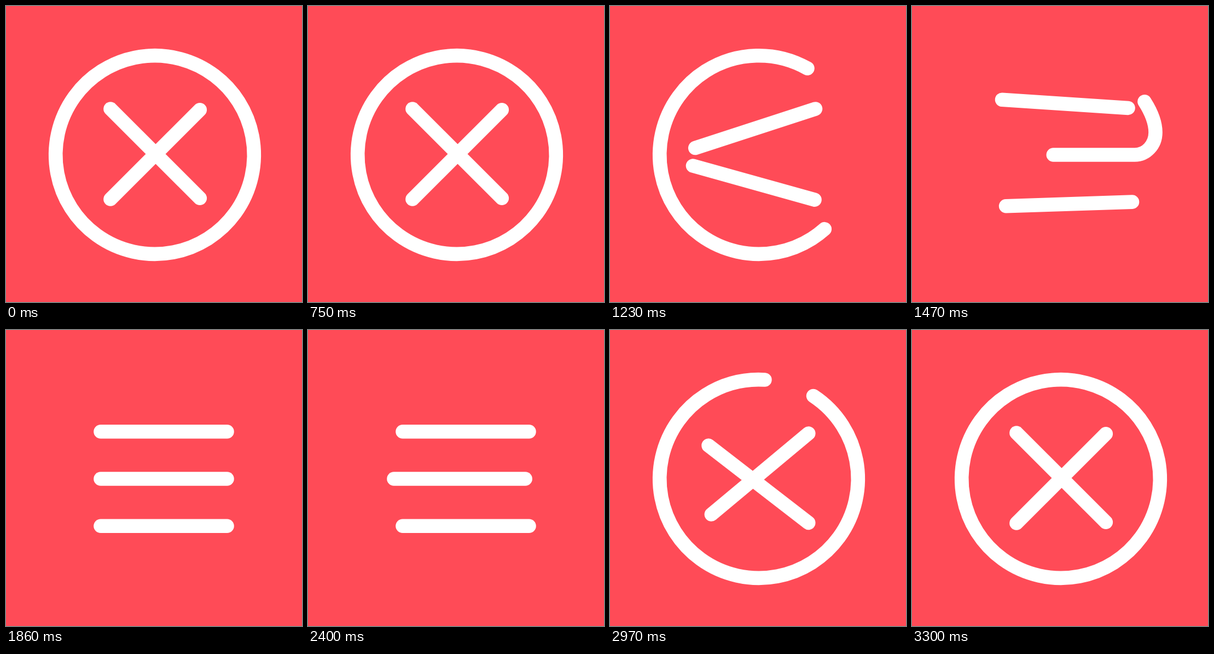
An HTML page with a canvas that plays this animation: 541 px wide and 541 px high, repeating every 3.75 s.

```html
<!DOCTYPE html>
<html lang="en">
<head>
<meta charset="utf-8">
<title>Menu toggle</title>
<style>
  html, body { margin: 0; width: 100%; height: 100%; overflow: hidden; background: #ff4b57; }
  canvas { display: block; width: 541px; height: 541px; }
</style>
</head>
<body>
<canvas id="stage" width="541" height="541"></canvas>
<script>
const ctx = document.getElementById('stage').getContext('2d');
const LOOP = 3750, STEP = 30, CLOSE_AT = 750, OPEN_AT = 2160;
const CENTER = 272, RADIUS = 181.3, JOIN = 32.4 * Math.PI / 180;
const BAR = 231;

const mix = (a, b, k) => a + (b - a) * k;
const cubic = (s, p, q) => 3 * s * (1 - s) ** 2 * p + 3 * s * s * (1 - s) * q + s ** 3;

function bezier(x, [x1, y1, x2, y2]) {
  if (x <= 0) return 0;
  if (x >= 1) return 1;
  let lo = 0, hi = 1;
  for (let i = 0; i < 30; i++) {
    const mid = (lo + hi) / 2;
    if (cubic(mid, x1, x2) < x) lo = mid; else hi = mid;
  }
  return cubic(lo, y1, y2);
}

// Each part: [delay, duration, curve]; values run 0 = menu, 1 = cross.
const closing = {
  start: [0, 1110, [.6, -.57, .4, 1.3]],
  end: [0, 1110, [.7, -.18, .2, 1.12]],
  topTurn: [0, 900, [.5, -.56, .5, 1.55]],
  bottomTurn: [0, 900, [.5, -.16, .5, 1.35]],
  topShift: [0, 900, [.5, 0, .5, .65]],
  bottomShift: [0, 900, [.5, -.8, .5, 1.25]]
};
const opening = {
  start: [0, 900, [.25, -.69, .5, 1]],
  end: [0, 1080, [.25, -.47, .5, 1]],
  topTurn: [270, 870, [.5, -.08, .5, 1.4]],
  bottomTurn: [270, 870, [.5, -.28, .5, 1.4]],
  topShift: [270, 870, [.2, .15, .5, 1]],
  bottomShift: [270, 870, [.2, .15, .5, 1]]
};

function amount(part, t) {
  const toCross = t >= OPEN_AT;
  const [delay, duration, curve] = (toCross ? opening : closing)[part];
  const k = bezier((t - (toCross ? OPEN_AT : CLOSE_AT) - delay) / duration, curve);
  return toCross ? k : 1 - k;
}

// Middle bar, bend, then the circle counter-clockwise with room for overlap.
const outline = new Path2D();
outline.moveTo(157, CENTER);
outline.lineTo(407, CENTER);
outline.bezierCurveTo(428, 272, 445, 254, 445, 231);
outline.bezierCurveTo(445, 211, 436, 192, 425.1, 174.9);
for (let i = 0; i < 3; i++) {
  outline.arc(CENTER, CENTER, RADIUS, -JOIN - i * Math.PI, -JOIN - (i + 1) * Math.PI, true);
}

function drawOutline(t) {
  const start = Math.max(0, mix(16, 556, amount('start', t)));
  const end = Math.max(start + 1, mix(247, 1781, amount('end', t)));
  ctx.setLineDash([end - start, 5000]);
  ctx.lineDashOffset = -start;
  ctx.stroke(outline);
  ctx.setLineDash([]);
}

function drawBar(shift, turn, menuY, crossY, crossX, side) {
  const x = mix(404, crossX, shift), y = mix(menuY, crossY, shift);
  const angle = turn * Math.PI / 4;
  ctx.beginPath();
  ctx.moveTo(x, y);
  ctx.lineTo(x - BAR * Math.cos(angle), y + side * BAR * Math.sin(angle));
  ctx.stroke();
}

function draw(t) {
  ctx.fillStyle = '#ff4b57';
  ctx.fillRect(0, 0, 541, 541);
  ctx.strokeStyle = '#fff';
  ctx.lineWidth = 25.6;
  ctx.lineCap = 'round';
  drawOutline(t);
  drawBar(amount('topShift', t), amount('topTurn', t), 185.7, 189.7, 354.3, 1);
  drawBar(amount('bottomShift', t), amount('bottomTurn', t), 358.3, 351.3, 354.3, -1);
}

function tick() {
  const t = performance.now() % LOOP;
  draw(Math.floor(t / STEP) * STEP);
  requestAnimationFrame(tick);
}
tick();
</script>
</body>
</html>
```
